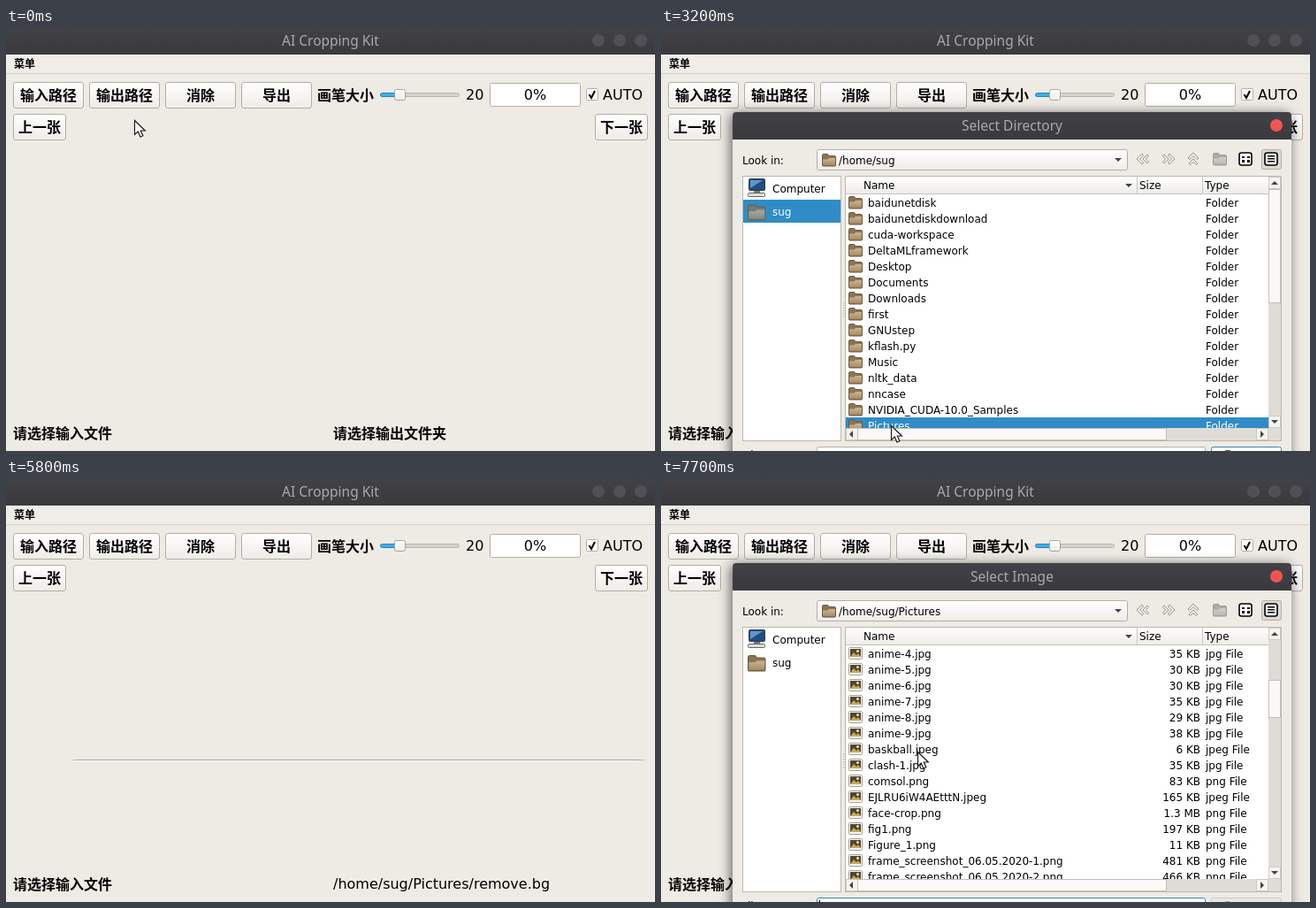
These frames come from a looping animation (734x478 px, 8000 ms). An HTML page:

```html
<!DOCTYPE html>
<html lang="zh">
<head>
<meta charset="utf-8">
<title>AI Cropping Kit</title>
<style>
html, body { margin: 0; width: 100%; height: 100%; overflow: hidden; background: #eeebe5; }
svg { display: block; width: 734px; height: 478px; font: 12px "DejaVu Sans", sans-serif; }
text { white-space: pre; }
.cjk { font: bold 16px "Noto Sans CJK SC", "Noto Sans CJK JP", sans-serif; }
.big { font-size: 16px; }
.title { font: 15.5px "Noto Sans", "Open Sans", sans-serif; fill: #a9a9a6; text-anchor: middle; }
.frame { filter: drop-shadow(-2px 2px 7px rgba(0, 0, 0, .6)); }
.a { animation: 8s step-end -20ms infinite; }
.dlg { transform-origin: 397px 317px; }

#cursor { animation-name: cursor; }
#hoverOut { animation-name: hoverOut; }
#hoverIn { animation-name: hoverIn; }
#askOut { animation-name: askOut; }
#outPath { animation-name: outPath; }
#dirs { animation-name: dirs; }
#images { animation-name: images; }
#project { animation-name: project; }
#home { animation-name: home; }
#pictures { animation-name: pictures; }
#pickPictures { animation-name: pickPictures; }
#pickOutput { animation-name: pickOutput; }
#rows { animation-name: rows; }
#thumb { animation-name: thumb; }
#caret { animation-name: caret; }
#line { animation-name: line; }

@keyframes cursor {
  0% { transform: translate(145px, 104px); }
  2.5% { transform: translate(140px, 69px); }
  7.5% { transform: translate(148px, 95px); }
  8.75% { transform: translate(170px, 130px); }
  10% { transform: translate(200px, 170px); }
  11.25% { transform: translate(230px, 205px); }
  12.5% { transform: translate(246px, 226px); }
  13.75% { transform: translate(252px, 236px); }
  15% { transform: translate(240px, 236px); }
  16.25% { transform: translate(195px, 222px); }
  17.5% { transform: translate(162px, 209px); }
  18.75% { transform: translate(154px, 206px); }
  23.75% { transform: translate(164px, 216px); }
  25% { transform: translate(192px, 248px); }
  26.25% { transform: translate(230px, 290px); }
  27.5% { transform: translate(260px, 328px); }
  28.75% { transform: translate(274px, 352px); }
  30% { transform: translate(290px, 382px); }
  31.25% { transform: translate(340px, 420px); }
  32.5% { transform: translate(410px, 444px); }
  33.75% { transform: translate(466px, 449px); }
  35% { transform: translate(400px, 450px); }
  36.25% { transform: translate(260px, 449px); }
  46.25% { transform: translate(262px, 410px); }
  47.5% { transform: translate(268px, 330px); }
  48.75% { transform: translate(274px, 262px); }
  50% { transform: translate(277px, 236px); }
  51.25% { transform: translate(275px, 220px); }
  53.75% { transform: translate(266px, 200px); }
  57.5% { transform: translate(420px, 330px); }
  58.75% { transform: translate(630px, 453px); }
  61.25% { transform: translate(645px, 469px); }
  63.75% { transform: translate(668px, 471px); }
  66.25%, 100% { transform: translate(680px, 500px); }
  76.25% { transform: translate(430px, 355px); }
  77.5% { transform: translate(310px, 250px); }
  78.75% { transform: translate(180px, 155px); }
  80% { transform: translate(90px, 92px); }
  81.25% { transform: translate(57px, 71px); }
  86.25% { transform: translate(80px, 100px); }
  87.5% { transform: translate(150px, 180px); }
  88.75% { transform: translate(230px, 260px); }
  90% { transform: translate(280px, 300px); }
  91.25%, 100% { transform: translate(290px, 308px); }
}
@keyframes hoverOut { 0%, 6.25%, 100% { opacity: 0; } 2.5% { opacity: .6; } }
@keyframes hoverIn { 0%, 85%, 100% { opacity: 0; } 81.25% { opacity: .6; } }
@keyframes askOut { 0% { opacity: 1; } 68.75%, 100% { opacity: 0; } }
@keyframes outPath { 0% { opacity: 0; } 68.75%, 100% { opacity: 1; } }
@keyframes dirs {
  0%, 72.5%, 100% { opacity: 0; }
  5% { opacity: .86; transform: scaleY(.75); filter: brightness(.88); }
  6.25% { opacity: 1; transform: none; filter: none; }
  68.75% { opacity: .9; transform: scaleY(.88); filter: brightness(.92); }
  70% { opacity: .8; transform: scaleY(.55); filter: brightness(.88); }
  71.25% { opacity: .7; transform: scaleY(.2); filter: brightness(.85); }
}
@keyframes images {
  0% { opacity: 0; }
  83.75% { opacity: .86; transform: scaleY(.75); filter: brightness(.88); }
  85%, 100% { opacity: 1; transform: none; filter: none; }
}
@keyframes project { 0% { visibility: visible; } 20%, 100% { visibility: hidden; } }
@keyframes home { 0%, 45%, 100% { visibility: hidden; } 20% { visibility: visible; } }
@keyframes pictures { 0% { visibility: hidden; } 45%, 100% { visibility: visible; } }
@keyframes pickPictures { 0%, 45%, 100% { visibility: hidden; } 38.75% { visibility: visible; } }
@keyframes pickOutput { 0% { visibility: hidden; } 56.25%, 100% { visibility: visible; } }
@keyframes rows {
  0% { transform: translateY(0); }
  91.25% { transform: translateY(-54px); }
  92.5% { transform: translateY(-108px); }
  93.75% { transform: translateY(-162px); }
  95% { transform: translateY(-216px); }
  96.25%, 100% { transform: translateY(-270px); }
}
@keyframes thumb {
  0% { transform: translateY(0); }
  91.25% { transform: translateY(9px); }
  92.5% { transform: translateY(18px); }
  93.75% { transform: translateY(27px); }
  95% { transform: translateY(36px); }
  96.25%, 100% { transform: translateY(45px); }
}
@keyframes caret { 0%, 96.25%, 100% { opacity: 1; } 90% { opacity: 0; } }
@keyframes line { 0%, 73.75%, 100% { opacity: 0; } 72.5% { opacity: 1; } }
</style>
</head>
<body>
<svg id="stage" viewBox="0 0 734 478">
  <defs>
    <linearGradient id="btn" x2="0" y2="1"><stop stop-color="#fff"/><stop offset="1" stop-color="#eeece8"/></linearGradient>
    <linearGradient id="bar" x2="0" y2="1"><stop stop-color="#424246"/><stop offset="1" stop-color="#3a3a3e"/></linearGradient>
    <linearGradient id="wood" x2="0" y2="1"><stop stop-color="#cdb592"/><stop offset="1" stop-color="#a58c68"/></linearGradient>
    <linearGradient id="fade">
      <stop stop-color="#a5a4a1" stop-opacity="0"/><stop offset=".015" stop-color="#a5a4a1"/>
      <stop offset=".98" stop-color="#a5a4a1"/><stop offset="1" stop-color="#a5a4a1" stop-opacity="0"/>
    </linearGradient>
    <clipPath id="wide"><rect x="209" y="168" width="492" height="284"/></clipPath>
    <clipPath id="narrow"><rect x="209" y="168" width="478" height="284"/></clipPath>
    <clipPath id="wideBody"><rect x="209" y="188" width="492" height="264"/></clipPath>
    <clipPath id="narrowBody"><rect x="209" y="188" width="478" height="264"/></clipPath>
    <g id="folder">
      <path d="M.5 13V2q0-1.500 1.500-1.500h4.500l1.500 2h6q1.500 0 1.500 1.500v9q0 1-1 1h-13q-1 0-1-1z" fill="#8a7452" stroke="#6d5a3d"/>
      <path d="M1 13V6.500h5.500l1.500-1.500h7v8z" fill="url(#wood)"/>
    </g>
    <g id="file">
      <rect x=".5" y=".5" width="15" height="13" rx="1" fill="#f7f6f3" stroke="#a3a09a"/>
      <rect x="2" y="2" width="12" height="9" fill="#50462f"/>
      <path d="M2 11l4-5 3 3 2-2 3 4z" fill="#c9a75d"/><circle cx="10.500" cy="4.500" r="1.500" fill="#ece3bd"/>
    </g>
  </defs>
</svg>
<script>
const user = 'sug';
const edge = '#b3afa7', blue = '#308cc6';

const rect = (x, y, w, h, fill, more = '') =>
  `<rect x="${x}" y="${y}" width="${w}" height="${h}" fill="${fill}" ${more}/>`;
const box = (x, y, w, h, fill, stroke = edge, r = 2) =>
  rect(x + .5, y + .5, w - 1, h - 1, fill, `stroke="${stroke}" rx="${r}"`);
const text = (x, y, s, more = '') => `<text x="${x}" y="${y}" ${more}>${s}</text>`;
const path = (d, more) => `<path d="${d}" ${more}/>`;
const icon = (id, x, y, scale = 1) => `<use href="#${id}" transform="translate(${x} ${y}) scale(${scale})"/>`;
const tri = (x, y, turn = 0) =>
  path('M-4-2h8l-4 4z', `transform="translate(${x} ${y}) rotate(${turn})" fill="#444"`);
const anim = (id, body, cls = '') => `<g id="${id}" class="a ${cls}">${body}</g>`;

function button(x, y, w, label, hover) {
  return box(x, y, w, 30, 'url(#btn)', edge, 2.5)
    + (hover ? anim(hover, rect(x + 1, y + 1, w - 2, 28, '#fff')) : '')
    + text(x + w / 2, y + 21, label, 'class="cjk" text-anchor="middle"');
}

function mainWindow() {
  const dots = [670, 694, 718].map(x => `<circle cx="${x}" cy="14" r="7" fill="#515155"/>`).join('');
  return rect(0, 0, 734, 478, '#eeebe5') + rect(0, 0, 734, 30, 'url(#bar)')
    + text(367, 20, 'AI Cropping Kit', 'class="title"') + dots
    + rect(0, 30, 734, 21, '#f0ede8') + rect(0, 51, 734, 1, '#d6d2cb')
    + text(9, 45, '菜单', 'class="cjk" style="font-size:12px"')
    + button(8, 61, 80, '输入路径', 'hoverIn') + button(94, 61, 80, '输出路径', 'hoverOut')
    + button(180, 61, 80, '消除') + button(266, 61, 80, '导出')
    + button(8, 97, 60, '上一张') + button(666, 97, 60, '下一张')
    + text(352, 82, '画笔大小', 'class="cjk"')
    + box(423, 73, 90, 5, '#d5d2cd', '#bab6ae') + box(423, 73, 20, 5, '#3daee9', '#2a84bd')
    + box(439, 69, 13, 13, 'url(#btn)', '#a9a59d')
    + text(520, 81, '20', 'class="big"')
    + box(547, 62, 103, 27, '#fff') + text(598.5, 81, '0%', 'class="big" text-anchor="middle"')
    + box(656, 68, 14, 14, '#fff', edge, 1)
    + path('M659.500 75l2.500 4 4-8', 'fill="none" stroke="#000" stroke-width="2"')
    + text(675, 81, 'AUTO', 'class="big"')
    + text(8, 464, '请选择输入文件', 'class="cjk"')
    + anim('askOut', text(370, 464, '请选择输出文件夹', 'class="cjk"'))
    + anim('outPath', text(370, 463, `/home/${user}/Pictures/remove.bg`, 'class="big"'));
}

function navIcons() {
  const arrow = (x, turn) => path('M-7 0l6-6 1.500 2-4 4 4 4-1.500 2zM0 0l5-5 1.500 1.500-3 3.500 3 3.500-1.500 1.500z',
    `transform="translate(${x} 148) rotate(${turn})" fill="#f4f2ee" stroke="#96938d"`);
  const frame = x => rect(x, 141, 14, 14, '#fff', 'rx="2.5" stroke="#000" stroke-width="1.6"');
  const dots = [0, 4, 8].map(i => i % 8 ? '' : rect(657 + i * .75, 145, 3, 2, '#000') + rect(657 + i * .75, 149, 3, 3, '#000')).join('');
  const lines = [144, 147, 150].map(y => rect(686, y, 8, 1.5, '#000')).join('');
  return arrow(545, 0) + arrow(574, 180) + arrow(602, 90)
    + `<g opacity=".55" style="filter:grayscale(1)">${icon('folder', 624, 141)}</g>`
    + frame(654) + dots + box(679, 137, 23, 23, '#dcd9d4') + frame(683) + lines;
}

function row(i, [name, size = '', type = 'Folder'], color = '#000') {
  const y = 202 + 18 * i;
  return icon(size ? 'file' : 'folder', 212, y - 12) + `<g fill="${color}">` + text(234, y, name)
    + text(610, y, size, 'text-anchor="end"') + text(616, y, type) + text(694, y, '2') + '</g>';
}

const picked = (id, i, entry, width) =>
  anim(id, rect(209, 188 + 18 * i, width, 18, blue) + row(i, entry, '#fff'));

function scrollBars(tall, thumb) {
  const right = tall ? 687 : 701;
  let s = rect(209, 452, 492, 14, '#dfdcd7') + box(209, 452, 14, 14, '#f5f3f0', '#cdc9c2', 0)
    + box(right - 14, 452, 14, 14, '#f5f3f0', '#cdc9c2', 0) + tri(215, 459, 90) + tri(right - 7, 459, -90)
    + box(222, 452, tall ? 350 : 371, 14, '#faf9f7', '#c3bfb8', 0);
  if (tall) {
    s += rect(687, 168, 14, 284, '#dfdcd7') + box(687, 168, 14, 14, '#f5f3f0', '#cdc9c2', 0)
      + box(687, 438, 14, 14, '#f5f3f0', '#cdc9c2', 0) + tri(694, 175, 180) + tri(694, 445) + thumb;
  }
  return s;
}

const grip = h => box(687, 182, 14, h, '#faf9f7', '#c3bfb8', 0);

// One folder view: path, side bar, file list and name field.
function view({ dir, rows, extra = '', thumb = '', side = false, focus = false, scroll }) {
  const clip = thumb ? 'narrow' : 'wide';
  const list = rows.map((r, i) => row(i, r)).join('') + extra;
  const sep = [538, 612, 691].map(x => rect(x, 168, 1, 19, '#cbc7c0')).join('');
  return icon('folder', 182, 142) + text(201, 154, dir)
    + (side ? rect(93, 194, 110, 26, blue) : '')
    + `<g ${side ? 'opacity=".75"' : ''}>${icon('folder', 98, 199, 1.28)}</g>`
    + text(126, 212, user, `fill="${side ? '#fff' : '#000'}"`)
    + box(208, 167, 494, 300, '#fff', '#bdb9b2', 0)
    + `<g clip-path="url(#${clip})">` + rect(209, 168, 492, 19, 'url(#btn)') + rect(209, 187, 492, 1, '#c6c2bb')
    + sep + text(229, 182, 'Name') + tri(529, 178) + text(541, 182, 'Size') + text(615, 182, 'Type') + text(694, 182, 'Date') + '</g>'
    + `<g clip-path="url(#${clip}Body)">${scroll ? anim(scroll, list) : list}</g>`
    + scrollBars(!!thumb, thumb)
    + box(176, 473, 440, 22, '#fff', focus ? '#3584b5' : edge);
}

function dialog(id, title, labels, accept, body, enabled) {
  const grips = Array.from({ length: 6 }, (_, i) => rect(206, 310 + 3 * i, 1, 1, '#aaa69f')).join('');
  return anim(id,
    path('M81 539V99q0-4 4-4h624q4 0 4 4v440z', 'class="frame" fill="#eeebe5"')
    + path('M81 126V99q0-4 4-4h624q4 0 4 4v27z', 'fill="url(#bar)"')
    + text(397, 116, title, 'class="title"') + '<circle cx="696" cy="110" r="7" fill="#f25454"/>'
    + text(92, 154, 'Look in:') + box(176, 137, 352, 24, 'url(#btn)') + tri(517, 149) + navIcons()
    + box(92, 167, 112, 300, '#fff', '#bdb9b2', 0)
    + box(99, 170, 19, 14, '#1f4d86', '#3b3b3b', 1) + path('M101 181v-9h14z', 'fill="#5f96cf"')
    + rect(105, 184, 7, 3, '#777') + box(98, 186, 20, 5, '#ddd', '#666', 1)
    + text(126, 186, 'Computer') + grips
    + text(92, 487, labels[0]) + text(92, 518, 'Files of type:')
    + box(176, 504, 440, 23, 'url(#btn)') + text(181, 518, labels[1]) + tri(605, 516)
    + box(622, 473, 80, 23, enabled ? 'url(#btn)' : '#ebe8e2', enabled ? '#3f83ad' : '#cbc7c0')
    + `<g opacity="${enabled ? 1 : .4}">${icon('folder', 637, 477)}${text(654, 488, accept)}</g>`
    + box(622, 504, 80, 23, 'url(#btn)') + '<circle cx="641" cy="515" r="6.500" fill="#d22"/>'
    + text(650, 519, '<tspan text-decoration="underline">C</tspan>ancel')
    + body, 'dlg');
}

const folders = s => s.split(' ').map(name => [name]);
const files = s => s.split('|').map(f => {
  const [name, size] = f.split(',');
  return [name, size, name.split('.').pop() + ' File'];
});

const homeRows = folders('baidunetdisk baidunetdiskdownload cuda-workspace DeltaMLframework Desktop Documents '
  + 'Downloads first GNUstep kflash.py Music nltk_data nncase NVIDIA_CUDA-10.0_Samples Pictures');
const picRows = folders('remove.bg Wallpapers');
const imageRows = files('1.jpg,14 KB|2.jpg,4 KB|2.png,31 KB|287100.jpg,593 KB|660075.png,1.3 MB|724938.jpg,2.0 MB'
  + '|826571.png,491 KB|836548.png,749 KB|837951.jpg,189 KB|a_softmax_res.png,17 KB|anime-1.jpg,35 KB'
  + '|anime-2.jpg,38 KB|anime-3.jpg,37 KB|anime-4.jpg,35 KB|anime-5.jpg,30 KB|anime-6.jpg,30 KB|anime-7.jpg,35 KB'
  + '|anime-8.jpg,29 KB|anime-9.jpg,38 KB|baskball.jpeg,6 KB|clash-1.jpg,35 KB|comsol.png,83 KB'
  + '|EJLRU6iW4AEtttN.jpeg,165 KB|face-crop.png,1.3 MB|fig1.png,197 KB|Figure_1.png,11 KB'
  + '|frame_screenshot_06.05.2020-1.png,481 KB|frame_screenshot_06.05.2020-2.png,466 KB');
const home = `/home/${user}`;

const dirViews =
  anim('project', view({ dir: home + '/workspace/qt-matting', focus: true,
    rows: folders('__pycache__ asset networks test test2 test3') }))
  + anim('home', view({ dir: home, rows: homeRows, side: true, thumb: grip(129),
    extra: picked('pickPictures', 14, homeRows[14], 478) }))
  + anim('pictures', view({ dir: home + '/Pictures', rows: picRows,
    extra: picked('pickOutput', 0, picRows[0], 492) }));

const imageView = view({ dir: home + '/Pictures', rows: [...picRows, ...imageRows], focus: true,
  scroll: 'rows', thumb: anim('thumb', grip(43)) })
  + anim('caret', rect(179, 476, 1, 16, '#000'));

document.getElementById('stage').insertAdjacentHTML('beforeend',
  mainWindow()
  + dialog('dirs', 'Select Directory', ['Directory:', 'Directories'], 'Choose', dirViews, true)
  + anim('line', rect(72, 317, 655, 1, 'url(#fade)') + rect(80, 318, 635, 1, '#fbfaf8'))
  + dialog('images', 'Select Image',
    ['File <tspan text-decoration="underline">n</tspan>ame:', 'Images (*.jpg *.jpeg *.tif *.bmp *.png)'],
    'Open', imageView, false)
  + anim('cursor', path('M.5 .5v16l3.800-3.500 2.600 6 3-1.300-2.600-5.700h5z', 'fill="#fff" stroke="#1c1c1c" stroke-width="1.2"')));
</script>
</body>
</html>
```
